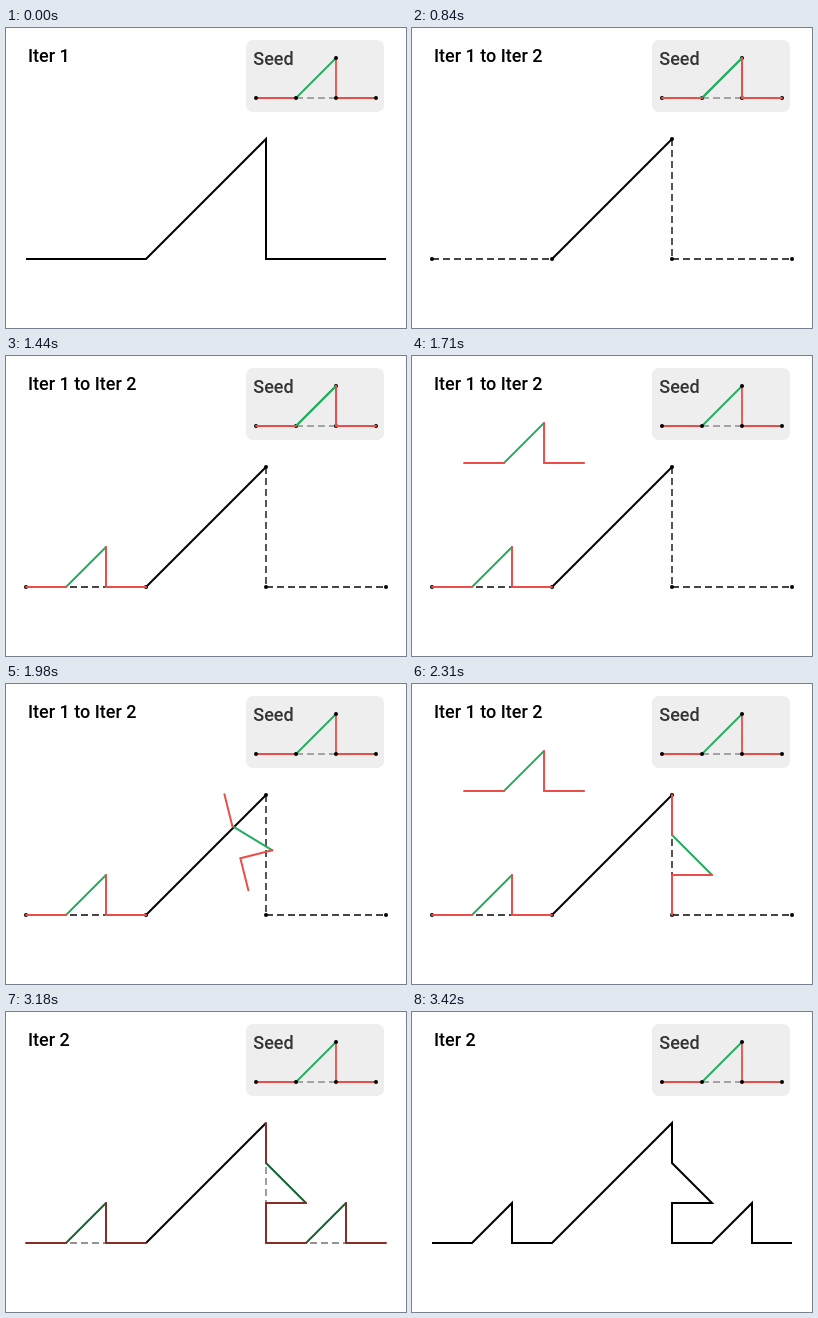
Write an HTML page that moves like this. It is 400 px wide and 300 px high and loops after 4200 ms.

```html
<!DOCTYPE html>
<html lang="en">
<head>
<meta charset="utf-8">
<title>Fractal seed iteration</title>
<style>
  html, body { margin: 0; width: 100%; height: 100%; overflow: hidden; background: #fff; }
  svg { display: block; width: 100vw; height: 100vh; }
  text { font: 500 18px Roboto, sans-serif; }
  polyline, path { fill: none; }
</style>
</head>
<body>
<svg id="stage" viewBox="0 0 400 300"></svg>
<script>
const LOOP = 4200, STEP = 30;
const FLY_START = 840, FLY_FRAMES = 20;
const FADE_START = 3030, FADE_FRAMES = 14;
const RED = [235, 77, 72], GREEN = [36, 172, 94];

const stage = document.getElementById('stage');

function add(tag, attrs, parent = stage) {
  const el = document.createElementNS('http://www.w3.org/2000/svg', tag);
  for (const key in attrs) el.setAttribute(key, attrs[key]);
  return parent.appendChild(el);
}

const show = (el, on) => el.setAttribute('visibility', on ? 'visible' : 'hidden');
const rgb = (color, darken) => `rgb(${color.map(c => Math.round(c * (1 - darken)))})`;
const mix = (a, b, s) => a.map((v, i) => v + (b[i] - v) * s);

// A pose is the start point followed by the direction vector of the base line.
const SEED = [250, 70, 120, 0];
const WAYPOINT = [51.5, 107, 120, 0];
const SLOTS = [[20, 231, 120, 0], [260, 111, 0, 120], [260, 231, 120, 0]];

function vertices([x, y, dx, dy]) {
  const at = (u, v) => [x + u * dx / 3 + v * dy / 3, y + u * dy / 3 - v * dx / 3];
  return [at(0, 0), at(1, 0), at(2, 1), at(2, 0), at(3, 0)];
}

function makeShape(parent, width) {
  const style = { 'stroke-width': width, 'stroke-linecap': 'round' };
  const green = add('polyline', style, parent);
  const red = add('path', style, parent);
  return {
    pose(p) {
      const v = vertices(p);
      green.setAttribute('points', `${v[1]} ${v[2]}`);
      red.setAttribute('d', `M${v[0]}L${v[1]}M${v[2]}L${v[3]}L${v[4]}`);
    },
    tint(darken) {
      green.setAttribute('stroke', rgb(GREEN, darken));
      red.setAttribute('stroke', rgb(RED, darken));
    },
    show(on) { show(green, on); show(red, on); }
  };
}

const addDots = (points, parent) =>
  points.forEach(([cx, cy]) => add('circle', { cx, cy, r: 2 }, parent));

// Seed panel
add('rect', { x: 240, y: 12, width: 138, height: 72, rx: 7, fill: '#eee' });
add('text', { x: 247.3, y: 37, fill: '#333' }).textContent = 'Seed';
add('path', { d: 'M290 70H330', stroke: '#8c8c8c', 'stroke-width': 1.6, 'stroke-dasharray': '7 4' });
const seed = makeShape(stage, 1.8);
seed.pose(SEED);
seed.tint(0);
addDots(vertices(SEED), stage);

// Main drawing
const title = add('text', { x: 22, y: 34 });
const ink = { stroke: '#000', 'stroke-width': 2 };
const corners = vertices([20, 231, 360, 0]);
const firstCurve = add('polyline', { ...ink, points: corners.join(' ') });
const dashes = add('path', {
  d: 'M20 231H140M260 111V231M260 231H380',
  stroke: '#444', 'stroke-width': 1.8, 'stroke-dasharray': '7 4'
});
const diagonal = add('polyline', { ...ink, points: `${corners[1]} ${corners[2]}` });
const dots = add('g', {});
addDots(corners, dots);
const copies = SLOTS.map(() => makeShape(stage, 2));
const secondCurve = add('polyline', {
  ...ink, points: SLOTS.flatMap(vertices).join(' ')
});

// Decelerates into the waypoint, then accelerates into the slot.
function flight(slot, frame) {
  const p = 2 * Math.min(frame / (FLY_FRAMES - 1), 1) - 1;
  return mix(WAYPOINT, p < 0 ? SEED : slot, p * p);
}

function render(now) {
  const t = Math.floor((now % LOOP) / STEP) * STEP;
  const flying = t >= FLY_START;
  const fadeFrame = (t - FADE_START) / STEP + 1;
  const fade = Math.min(Math.max(fadeFrame / FADE_FRAMES, 0), 1);
  const finished = fade === 1;

  title.textContent = t < 480 ? 'Iter 1' : t < 2730 ? 'Iter 1 to Iter 2' : 'Iter 2';
  show(firstCurve, !flying);
  show(dashes, flying && !finished);
  dashes.setAttribute('opacity', 1 - fade);
  show(diagonal, flying && !finished);
  show(dots, t >= 600 && t < 2730);
  show(secondCurve, finished);

  copies.forEach((copy, i) => {
    const frame = (t - FLY_START) / STEP - i * FLY_FRAMES;
    const visible = frame >= 0 && !finished;
    copy.show(visible);
    if (!visible) return;
    copy.pose(flight(SLOTS[i], frame));
    copy.tint(fade);
  });
}

const start = performance.now();
function tick() {
  render(performance.now() - start);
  requestAnimationFrame(tick);
}
tick();
</script>
</body>
</html>
```
